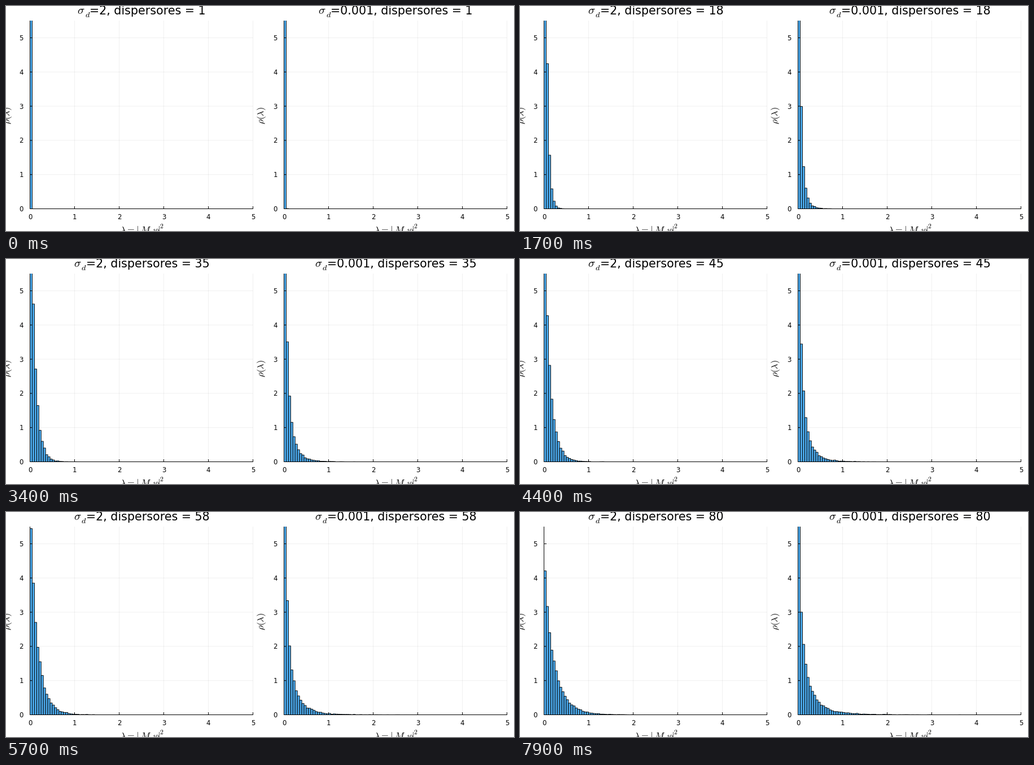
A matplotlib script for the animation above (8 s loop, 900 px wide and 400 px high).

```python
import numpy as np
import matplotlib.pyplot as plt
from matplotlib.animation import FuncAnimation
from matplotlib.collections import PolyCollection
from matplotlib.patches import Rectangle

DPI = 100
PX = 72 / DPI
FRAMES = 80
BINS, WIDTH = 100, 0.05
SAMPLES = 20000
X0, Y0, TOP = 42.5, 360.5, 26
SX, SY = 79, 60.8
TITLE, LABEL, TICK, SMALL = 20.6, 16.4, 11.8, 0.7

plt.rcParams.update({"font.family": "DejaVu Sans", "mathtext.fontset": "cm"})


def write(ax, x, y, s, size, ha="left", **kw):
    kw.setdefault("va", "baseline")
    return ax.text(x, y, s, ha=ha, fontsize=size * PX, **kw)


class Panel:
    """Histogram of a Weibull sample whose scale grows as a power of n."""

    def __init__(self, ax, dx, sigma, scale, power, shape, seed):
        self.x0 = X0 + dx
        self.sigma, self.seed = sigma, seed
        self.scale, self.power, self.shape = scale, power, shape
        self.draw_axes(ax)
        self.draw_labels(ax)
        self.bars = PolyCollection([], facecolor="#4cabee", edgecolor="black",
                                   linewidth=0.9 * PX, zorder=2, snap=False)
        ax.add_collection(self.bars, autolim=False)
        self.bars.set_clip_path(Rectangle((self.x0 - 1, TOP), 5 * SX + 2,
                                          Y0 - TOP + 1, transform=ax.transData))

    def draw_axes(self, ax):
        x0, right = self.x0, self.x0 + 5 * SX

        def line(xs, ys, **kw):
            ax.plot(xs, ys, lw=PX, solid_capstyle="butt", snap=False, **kw)

        grid = dict(color="black", alpha=0.06, zorder=1)
        axis = dict(color="black", zorder=3)
        for i in range(6):
            x, y = x0 + i * SX, Y0 - i * SY
            line([x, x], [Y0, TOP], **grid)
            line([x0, right], [y, y], **grid)
            line([x, x], [Y0, Y0 - 4.5], **axis)
            line([x0, x0 + 4.5], [y, y], **axis)
            write(ax, x, 379, str(i), TICK, "center")
            write(ax, x0 - 11.8, y + 4.4, str(i), TICK, "right")
        line([x0 - .5, right + .5], [Y0, Y0], **axis)
        line([x0, x0], [Y0, TOP], **axis)

    def draw_labels(self, ax):
        x0, mid = self.x0, self.x0 + 2.5 * SX
        write(ax, mid - 38, 403, r"$\lambda = |\;M$", LABEL)
        write(ax, mid + 19, 404.5, "$10$", LABEL * SMALL)
        write(ax, mid + 28.5, 403, "$|$", LABEL)
        write(ax, mid + 32, 395, "$2$", LABEL * SMALL)
        write(ax, x0 - 39.5, 194, r"$\rho(\lambda)$", LABEL, "center",
              va="center", rotation=90)

        # The symbol hangs on the left end of the centred title
        self.title = write(ax, mid + 11, 15.3, "=, p", TITLE, "center")
        for s, size, x, y in [(r"$\sigma$", TITLE, -22, 5),
                              ("$d$", TITLE * SMALL, -8.5, -1)]:
            ax.annotate(s, (0, 0), xycoords=self.title, xytext=(x, y),
                        textcoords="offset pixels", va="baseline",
                        fontsize=size * PX, annotation_clip=False)

    def heights(self, n):
        edges = np.arange(BINS + 1) * WIDTH
        tail = np.exp(-(edges / (self.scale * n ** self.power)) ** self.shape)
        tail[-1] = 0
        rng = np.random.default_rng(self.seed + n)
        return rng.multinomial(SAMPLES, -np.diff(tail)) / (SAMPLES * WIDTH)

    def update(self, n):
        w = WIDTH * SX
        verts = []
        for i, h in enumerate(self.heights(n)):
            a, y = self.x0 + i * w, Y0 - min(h, 6) * SY
            verts.append([(a, Y0), (a, y), (a + w, y), (a + w, Y0)])
        self.bars.set_verts(verts)
        self.title.set_text(f"={self.sigma}, dispersores = {n}")


fig = plt.figure(figsize=(9, 4), dpi=DPI, facecolor="white")
ax = fig.add_axes([0, 0, 1, 1])
ax.set(xlim=(0, 900), ylim=(400, 0))
ax.axis("off")

panels = [
    Panel(ax, 0, "2", 0.0020, 1.082, 0.95, seed=100),
    Panel(ax, 450, "0.001", 0.00197, 1, 0.685, seed=500),
]


def update(frame):
    for panel in panels:
        panel.update(frame + 1)
    return []


anim = FuncAnimation(fig, update, frames=FRAMES, interval=100,
                     repeat=True, repeat_delay=0, blit=False)
plt.show()
```
